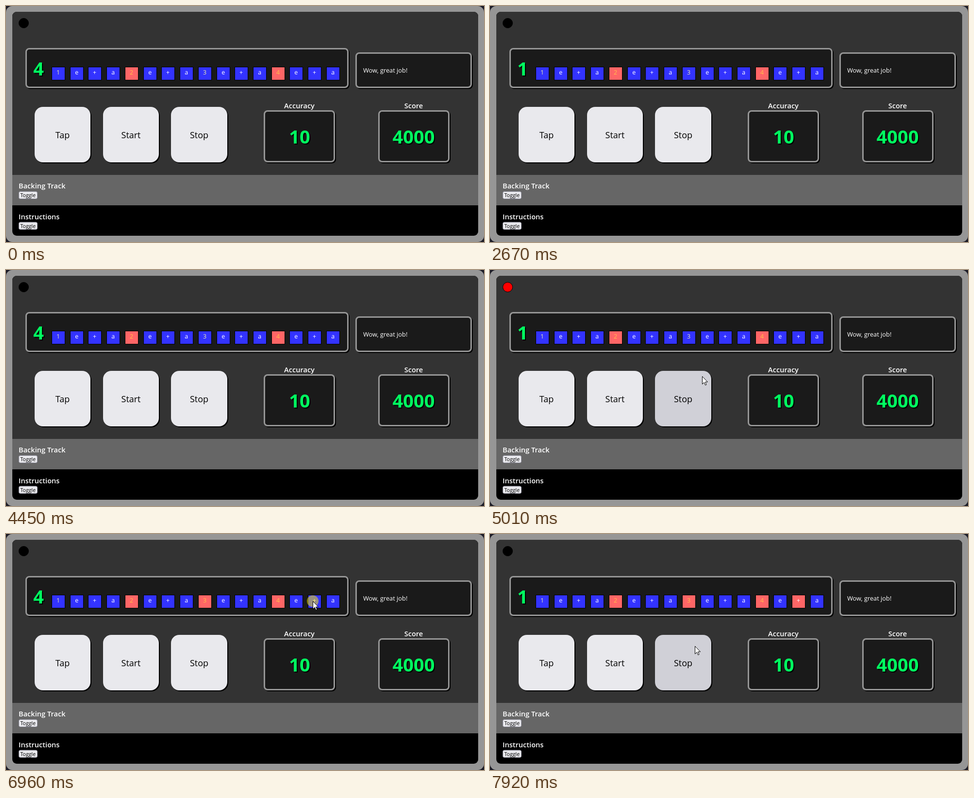
Recreate the animation shown at these times as an HTML page. Size 985 by 489 pixels, loop 7.99 s.

```html
<!DOCTYPE html>
<html lang="en">
<head>
<meta charset="utf-8">
<title>Rhythm trainer</title>
<style>
  html, body { margin: 0; width: 100%; height: 100%; overflow: hidden; background: #1b1b26; }
  svg { display: block; font-family: "Open Sans", "Noto Sans", sans-serif; }
  .digits { font-size: 38px; font-weight: 700; fill: #00ff60; text-anchor: middle; filter: drop-shadow(2px 2px 0 #000); }
  .title { font-size: 14.6px; font-weight: 600; fill: #fff; }
  .mid { text-anchor: middle; }
  .label { font-size: 12.5px; text-anchor: middle; }
  .button { font-size: 18px; text-anchor: middle; }
  .small { font-size: 10.5px; text-anchor: middle; }
  #beam { mix-blend-mode: difference; }
</style>
</head>
<body>
<svg id="stage" width="985" height="489" viewBox="0 0 985 489"></svg>
<script>
const LOOP = 7990;
const stage = document.getElementById("stage");

function add(tag, attrs, text = "") {
  const el = document.createElementNS("http://www.w3.org/2000/svg", tag);
  for (const key in attrs) el.setAttribute(key, attrs[key]);
  el.textContent = text;
  return stage.appendChild(el);
}
const box = (x, y, width, height, rx, fill, more) =>
  add("rect", { x, y, width, height, rx, fill, ...more });
const write = (text, x, y, cls, fill) =>
  add("text", { x, y, class: cls, ...(fill && { fill }) }, text);

function panel(x, y, w, h) {
  box(x + 2, y + 2, w, h, 8, "#000");
  box(x + 1.5, y + 1.5, w - 3, h - 3, 6.5, "#1a1a1a", { stroke: "#969696", "stroke-width": 3 });
}
function button(text, x, w) {
  box(x + 2, 211, w, 115, 17, "#000");
  const face = box(x, 209, w, 115, 17, "#e9e9ed");
  write(text, x + w / 2, 274, "button", "#000");
  return face;
}
function section(text, y) {
  write(text, 26, y + 28, "title");
  box(26.5, y + 34.5, 38, 15, 3, "#e9e9ed", { stroke: "#8f8f9d" });
  write("Toggle", 45.3, y + 46, "small", "#000");
}

// Static layout
box(0, 0, 985, 489, 13, "#969696");
box(13, 12, 960, 464, 9, "#000");
add("path", { d: "M13 350V21a9 9 0 0 1 9-9H964a9 9 0 0 1 9 9V350Z", fill: "#333" });
box(13, 350, 960, 63, 0, "#666");
section("Backing Track", 350);
section("Instructions", 413.5);

const light = add("circle", { cx: 36.5, cy: 35.5, r: 10, stroke: "#000" });

panel(40, 87, 666, 83);
panel(720, 96, 240, 74);
panel(531, 216, 147, 108);
panel(767, 216, 147, 108);
write("Wow, great job!", 736, 138, "", "#fff").style.fontSize = "12.8px";
write("Accuracy", 604.5, 212, "title mid");
write("Score", 840, 212, "title mid");
write("10", 605, 285, "digits");
write("4000", 840, 285, "digits");
const count = write("4", 67, 144, "digits");

button("Tap", 59, 115);
button("Start", 200, 115);
const stop = button("Stop", 340, 116);

const tiles = [..."1e+a2e+a3e+a4e+a"].map((text, i) => {
  const x = Math.round(94 + i * 37.73);
  const tile = box(x + .5, 126.5, 27, 27, 0, "#3333ff", { stroke: "#000" });
  const label = write(text, x + 13.7, 142, "label", "#fff");
  return { tile, label, isBeat: i % 4 === 0 };
});

const halo = add("circle", { r: 12, fill: "#fff000", "fill-opacity": .5 });
const arrow = add("path", {
  d: "M.5 .5V16.5L4.2 13L6.7 18.6L9 17.6L6.6 12H11.5Z", fill: "#fff", stroke: "#000"
});
const beam = add("path", {
  id: "beam", d: "M-4 -7.5H-1M1 -7.5H4M0 -7V8M-4 8.5H-1M1 8.5H4", fill: "none", stroke: "#fff"
});

// Light on and off times of each beat; the count starts over at 1 after 4
const beats = [[190, 320], [730, 930], [1330, 1530], [1930, 2080], [2540, 2670],
  [3130, 3260], [3720, 3850], [4310, 4450], [4910, 5050], [5500, 5640],
  [6150, 6340], [6750, 6890], [7370, 7510]];

// Pointer: time, x, y
const path = [[4520, 497, 430], [4730, 470, 330], [4870, 463, 285], [5090, 423, 183],
  [5230, 411, 140], [5710, 411, 140], [6270, 606, 151], [6480, 622, 149], [6680, 622, 149],
  [6820, 632, 139], [7100, 632, 139], [7440, 580, 226], [7650, 492, 248], [7920, 422, 232]];

function pointerAt(t) {
  const i = path.findIndex(p => p[0] > t);
  if (i < 0) return path[path.length - 1].slice(1);
  if (i === 0) return [-99, -99];
  const [t0, x0, y0] = path[i - 1], [t1, x1, y1] = path[i];
  const k = (t - t0) / (t1 - t0);
  return [x0 + (x1 - x0) * k, y0 + (y1 - y0) * k];
}
const show = (el, on) => el.setAttribute("visibility", on ? "visible" : "hidden");

function draw(t) {
  const passed = beats.filter(b => b[0] <= t).length;
  const lit = passed > 0 && t < beats[passed - 1][1];
  count.textContent = (passed + 3) % 4 + 1;
  light.setAttribute("fill", lit ? "#f00" : "#000");

  tiles.forEach(({ tile, label, isBeat }, i) => {
    const on = i === 4 || i === 12 || (i === 8 && t >= 5640) || (i === 14 && t >= 7030);
    tile.setAttribute("fill", on ? "#ff6666" : "#3333ff");
    if (isBeat) label.setAttribute("fill", on ? "#ffc04a" : "#ececb0");
  });

  const [x, y] = pointerAt(t).map(Math.round);
  const overText = t >= 5230 && t < 5780;
  const pressed = (t >= 5500 && t < 5640) || (t >= 6890 && t < 7030);
  for (const el of [halo, arrow, beam]) el.setAttribute("transform", `translate(${x} ${y})`);
  show(arrow, !overText);
  show(beam, overText);
  show(halo, pressed);
  const hover = x >= 340 && x < 456 && y >= 209 && y < 324;
  stop.setAttribute("fill", hover ? "#d0d0d7" : "#e9e9ed");
}

const start = performance.now();
function tick() {
  draw((performance.now() - start) % LOOP);
  requestAnimationFrame(tick);
}
tick();
</script>
</body>
</html>
```
